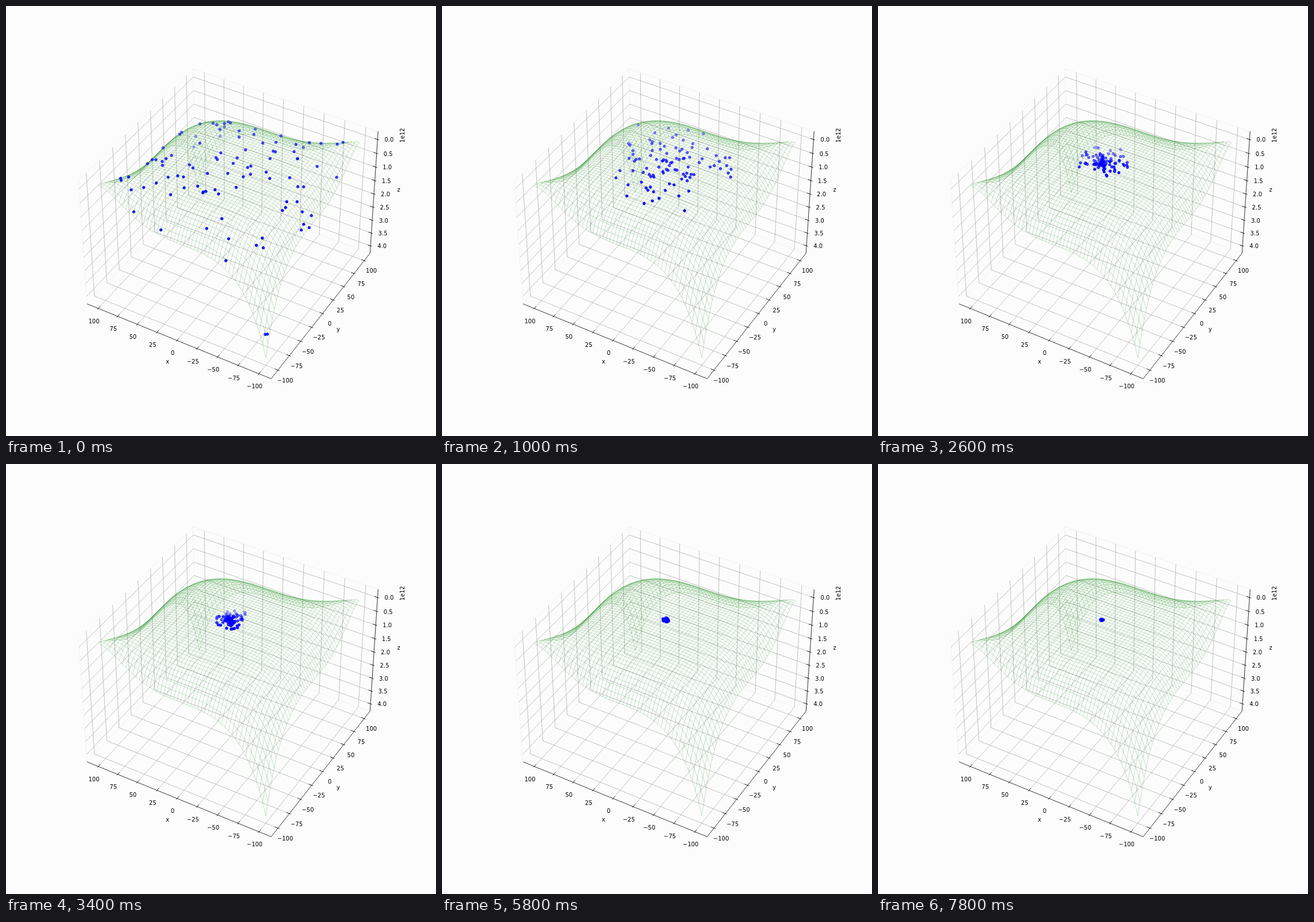
Write an HTML page that moves like this. It is 748 px wide and 748 px high and loops after 8000 ms.

```html
<!DOCTYPE html>
<html lang="en">
<head>
<meta charset="utf-8">
<title>Particle swarm on a surface</title>
<style>
  html, body { margin: 0; width: 100%; height: 100%; overflow: hidden; background: #fcfcfc; }
  svg { display: block; width: 100%; height: 100%; }
  path { fill: none; }
  text { font: 10px "DejaVu Sans", sans-serif; text-anchor: middle; fill: #000; }
  circle { fill: #00f; stroke: #00f; stroke-width: 1; }
</style>
</head>
<body>
<svg id="stage" viewBox="0 0 748 748"></svg>
<script>
const stage = document.getElementById('stage');

function add(tag, attrs, text) {
  const el = document.createElementNS('http://www.w3.org/2000/svg', tag);
  for (const key in attrs) el.setAttribute(key, attrs[key]);
  if (text !== undefined) el.textContent = text;
  stage.appendChild(el);
  return el;
}

// Perspective camera: elevation 40, azimuth -60, x and z axes flipped; z in units of 1e12
const SIN = Math.sin(40 * Math.PI / 180), COS = Math.cos(40 * Math.PI / 180);
const H = Math.sqrt(3) / 2;

function project([x, y, z]) {
  const X = -x / 220 * 1.1429, Y = y / 220 * 1.1429, Z = (2 - z) / 4.4 * 0.8571;
  const across = H * X + 0.5 * Y;
  const back = H * Y - 0.5 * X;
  const near = SIN * Z - COS * back;
  const k = 311.3 / (1 - near / 10);
  return { x: 391.1 + k * across, y: 369.9 - k * (SIN * back + COS * Z), near };
}

const line = pts => 'M' + pts.map(project).map(p => p.x.toFixed(2) + ' ' + p.y.toFixed(2)).join('L');
const range = (n, from = 0, step = 1) => Array.from({ length: n }, (_, i) => from + i * step);

// Axes box
const L = 110 * 25 / 24, TOP = 2 - 2.2 * 25 / 24, BOTTOM = 2 + 2.2 * 25 / 24;
const ticks = range(9, -100, 25), zTicks = range(9, 0, 0.5);

const panes = [
  [[L, -L, TOP], [L, L, TOP], [L, L, BOTTOM], [L, -L, BOTTOM], [L, -L, TOP]],
  [[L, L, TOP], [-L, L, TOP], [-L, L, BOTTOM], [L, L, BOTTOM]]
];
add('path', { d: panes.map(line).join(''), stroke: '#f1f1f1', 'stroke-width': 0.9 });

const grid = [
  ...ticks.map(x => [[x, -L, BOTTOM], [x, L, BOTTOM], [x, L, TOP]]),
  ...ticks.map(y => [[-L, y, BOTTOM], [L, y, BOTTOM], [L, y, TOP]]),
  ...zTicks.map(z => [[L, -L, z], [L, L, z], [-L, L, z]])
];
add('path', { d: grid.map(line).join(''), stroke: '#b0b0b0', 'stroke-width': 0.8 });

const IN = 3.67, OUT = 1.83;
const axes = [
  [[L, -L, BOTTOM], [-L, -L, BOTTOM], [-L, L, BOTTOM], [-L, L, TOP]],
  ...ticks.map(x => [[x, IN - L, BOTTOM], [x, -L - OUT, BOTTOM]]),
  ...ticks.map(y => [[IN - L, y, BOTTOM], [-L - OUT, y, BOTTOM]]),
  ...zTicks.map(z => [[IN - L, L, z], [-L - OUT, L, z]])
];
add('path', { d: axes.map(line).join(''), stroke: '#000', 'stroke-width': 0.8 });

function label(text, point, dx, dy) {
  const p = project(point);
  add('text', { x: p.x + dx, y: p.y + dy + 3.65 }, text);
}
const signed = v => String(v).replace('-', '\u2212');
ticks.forEach(v => {
  label(signed(v), [v, -L, BOTTOM], -7.5, 22);
  label(signed(v), [-L, v, BOTTOM], 12.5, 17.7);
});
zTicks.forEach(z => label(z.toFixed(1), [-L, L, z], 20, 0.6));
add('text', { x: 281, y: 622 }, 'x');
add('text', { x: 578, y: 566 }, 'y');
add('text', { x: 683, y: 323 }, 'z');
add('text', { transform: 'translate(692.5 225) rotate(-90)' }, '1e12');

// Wireframe of (x^3 + y^3)^2
const N = 50;
const nodes = range(N, -100, 200 / (N - 1));
const surface = (x, y) => [x, y, ((x ** 3 + y ** 3) / 1e6) ** 2];
const mesh = nodes.map(a =>
  line(nodes.map(b => surface(a, b))) + line(nodes.map(b => surface(b, a)))).join('');
add('path', { d: mesh, stroke: '#008000', 'stroke-width': 0.5, 'stroke-opacity': 0.45 });

// Swarm: scattered evenly, then spiralling into the minimum
const COUNT = 100, GOAL = 2.5;
let seed = 11;
function rand() {
  seed = (seed * 16807) % 2147483647;
  return seed / 2147483647;
}

const swarm = range(COUNT).map(() => {
  const dx = rand() * 200 - 100 - GOAL, dy = rand() * 200 - 100 - GOAL;
  return {
    reach: Math.hypot(dx, dy) / 100,
    angle: Math.atan2(dy, dx),
    spin: (rand() - 0.5) * 0.6,
    beat: 0.5 + rand() * 1.2,
    decay: 7 + 3.5 * rand() ** 4
  };
});
const dots = swarm.map(() => add('circle', { r: 2.24 }));

// The cloud gathers a dense core over the first steps
function place(p, k) {
  const tail = 1 + Math.min(1, (k / 9) ** 2);
  const wobble = 1 + 0.2 * Math.sin(p.beat * k);
  const r = 100 * Math.min(p.reach ** tail, 1.4) * Math.exp(-k / p.decay) * wobble;
  const a = p.angle + p.spin * k;
  return project(surface(GOAL + r * Math.cos(a), GOAL + r * Math.sin(a)));
}

function draw(k) {
  const pts = swarm.map(p => place(p, k)).sort((a, b) => a.near - b.near);
  const far = pts[0].near, span = pts[COUNT - 1].near - far;
  pts.forEach((p, i) => {
    const alpha = (0.3 + 0.7 * (p.near - far) / span).toFixed(3);
    dots[i].setAttribute('cx', p.x.toFixed(2));
    dots[i].setAttribute('cy', p.y.toFixed(2));
    dots[i].setAttribute('fill-opacity', alpha);
    dots[i].setAttribute('stroke-opacity', alpha);
  });
}

const STEP = 200, LOOP = 8000;
const begin = performance.now();
let shown = -1;
function tick() {
  const k = Math.floor(((performance.now() - begin) % LOOP) / STEP);
  if (k !== shown) draw(shown = k);
  requestAnimationFrame(tick);
}
tick();
</script>
</body>
</html>
```
